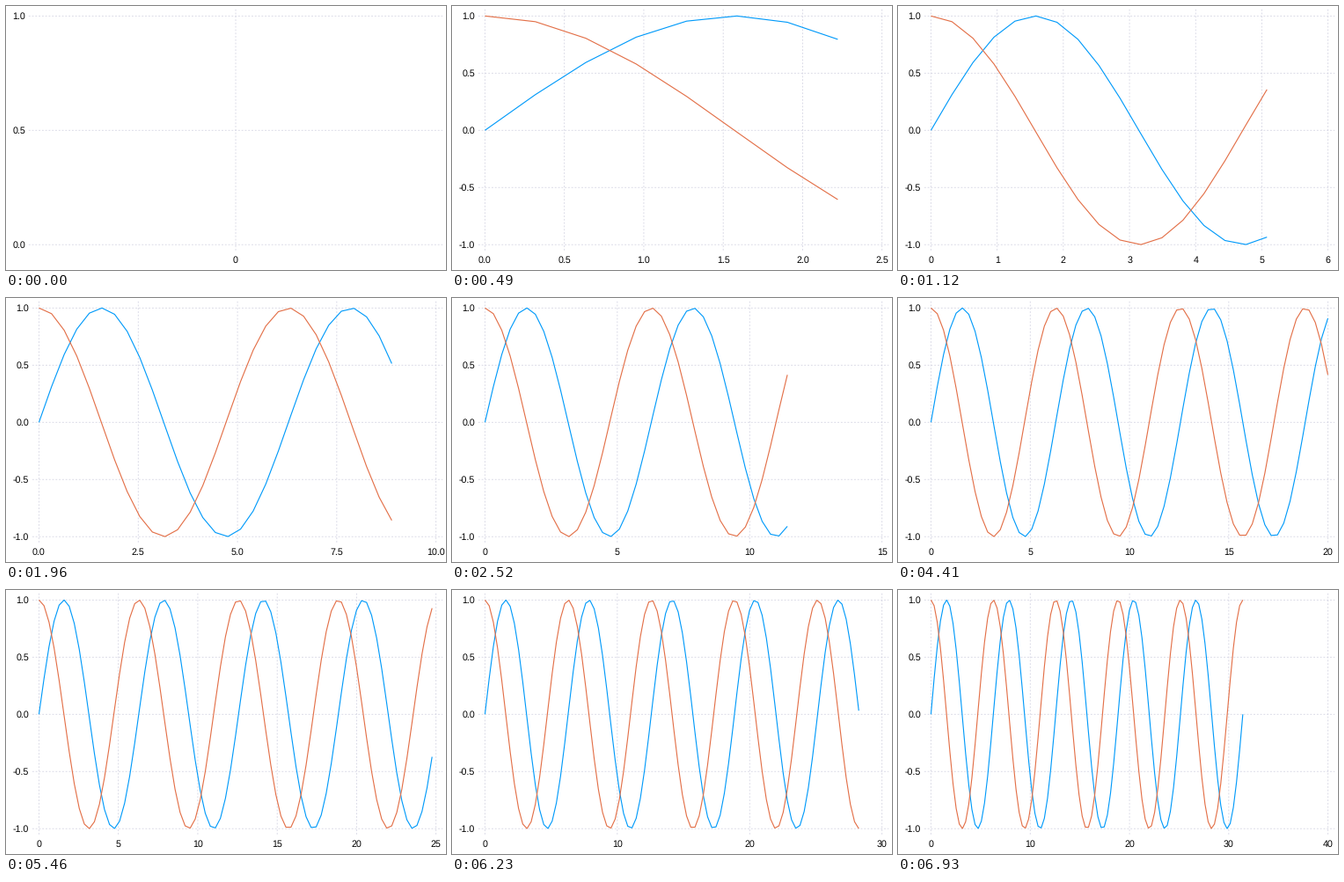
These frames come from a looping animation (500x300 px, 7000 ms). A matplotlib script:

```python
import math

import matplotlib.pyplot as plt
import numpy as np
from matplotlib.animation import FuncAnimation

W, H, DPI = 500, 300, 100
FRAMES, INTERVAL = 100, 70
PT = 72 / DPI  # points per pixel
MM = 96 / 25.4  # pixels per millimetre
TOP, BOTTOM, RIGHT = MM, 278.75, W - MM
PAD = 2 * MM
GRID = "#d0d0e0"
CURVES = [(np.sin, "#009afa"), (np.cos, "#e36f47")]
STEPS = [(1.0, 1.0), (5.0, 0.9), (2.0, 0.7), (2.5, 0.5), (3.0, 0.2)]

plt.rcParams["font.family"] = "Liberation Sans"
plt.rcParams["text.hinting"] = "none"


def nice_ticks(lo, hi):
    """Pick the best scoring evenly spaced ticks that enclose lo..hi."""
    span = hi - lo
    if span < 1e-12:
        return [lo], lo - 1, lo + 1
    best_score, best = -math.inf, None
    z = math.floor(math.log10(span)) + 1
    while 20 * 10.0 ** (z + 1) > span:
        for k in range(2, 11):
            for q, nice in STEPS:
                step = q * 10.0 ** z
                width = (k - 1) * step
                if width < span:
                    continue
                r = math.ceil((hi - width) / step)
                while r * step <= lo:
                    zero = 1.0 if r <= 0 and abs(r) < k else 0.0
                    count = 1 - abs(k - 5) / 5 if k < 10 else 0.0
                    cover = 1.5 * span / width
                    score = count / 4 + zero * (1 / 6) + (1 / 3) * cover + nice / 4
                    if width >= 2 * span:
                        score -= 1000
                    if score > best_score:
                        best_score, best = score, (r, k, step)
                    r += 1
        z -= 1
    r, k, step = best
    ticks = [(r + i) * step for i in range(k)]
    return ticks, ticks[0], ticks[-1]


def labels(ticks):
    digits = next(d for d in range(9)
                  if all(abs(round(t, d) - t) < 1e-9 for t in ticks))
    return [f"{t:.{digits}f}" for t in ticks]


def grid_line(xs, ys):
    ax.plot(xs, ys, color=GRID, lw=0.2 * MM * PT, dashes=(2.5, 2.5),
            dash_capstyle="butt", snap=False, zorder=1)


def label(x, y, text, align):
    ax.text(x, y, text, ha=align, va="baseline", fontsize=10.67 * PT,
            color="black")


fig = plt.figure(figsize=(W / DPI, H / DPI), dpi=DPI, facecolor="white")
ax = fig.add_axes([0, 0, 1, 1])


def draw(n):
    ax.clear()
    ax.axis("off")
    ax.set(xlim=(0, W), ylim=(H, 0))

    xs = 10 * math.pi * np.arange(n + 1) / (FRAMES - 1)
    curves = [(f(xs), color) for f, color in CURVES]
    values = np.concatenate([ys for ys, _ in curves])
    xticks, x0, x1 = nice_ticks(0.0, float(xs[-1]))
    yticks, y0, y1 = nice_ticks(float(values.min()), float(values.max()))
    left = 29.9 if y0 < 0 else 25.8  # room for the minus sign

    def px(x):
        return left + PAD + (x - x0) / (x1 - x0) * (RIGHT - left - 2 * PAD)

    def py(y):
        return BOTTOM - PAD - (y - y0) / (y1 - y0) * (BOTTOM - TOP - 2 * PAD)

    for t, text in zip(xticks, labels(xticks)):
        grid_line([px(t)] * 2, [TOP, BOTTOM])
        label(px(t), 291.8, text, "center")
    for t, text in zip(yticks, labels(yticks)):
        grid_line([left, RIGHT], [py(t)] * 2)
        label(left - MM, py(t) + 3.8, text, "right")
    for ys, color in curves:
        ax.plot(px(xs), py(ys), color=color, lw=0.3 * MM * PT, snap=False,
                solid_joinstyle="miter", solid_capstyle="butt", zorder=2)


anim = FuncAnimation(fig, draw, frames=FRAMES, init_func=lambda: None,
                     interval=INTERVAL, repeat=True, repeat_delay=0)
plt.show()
```
